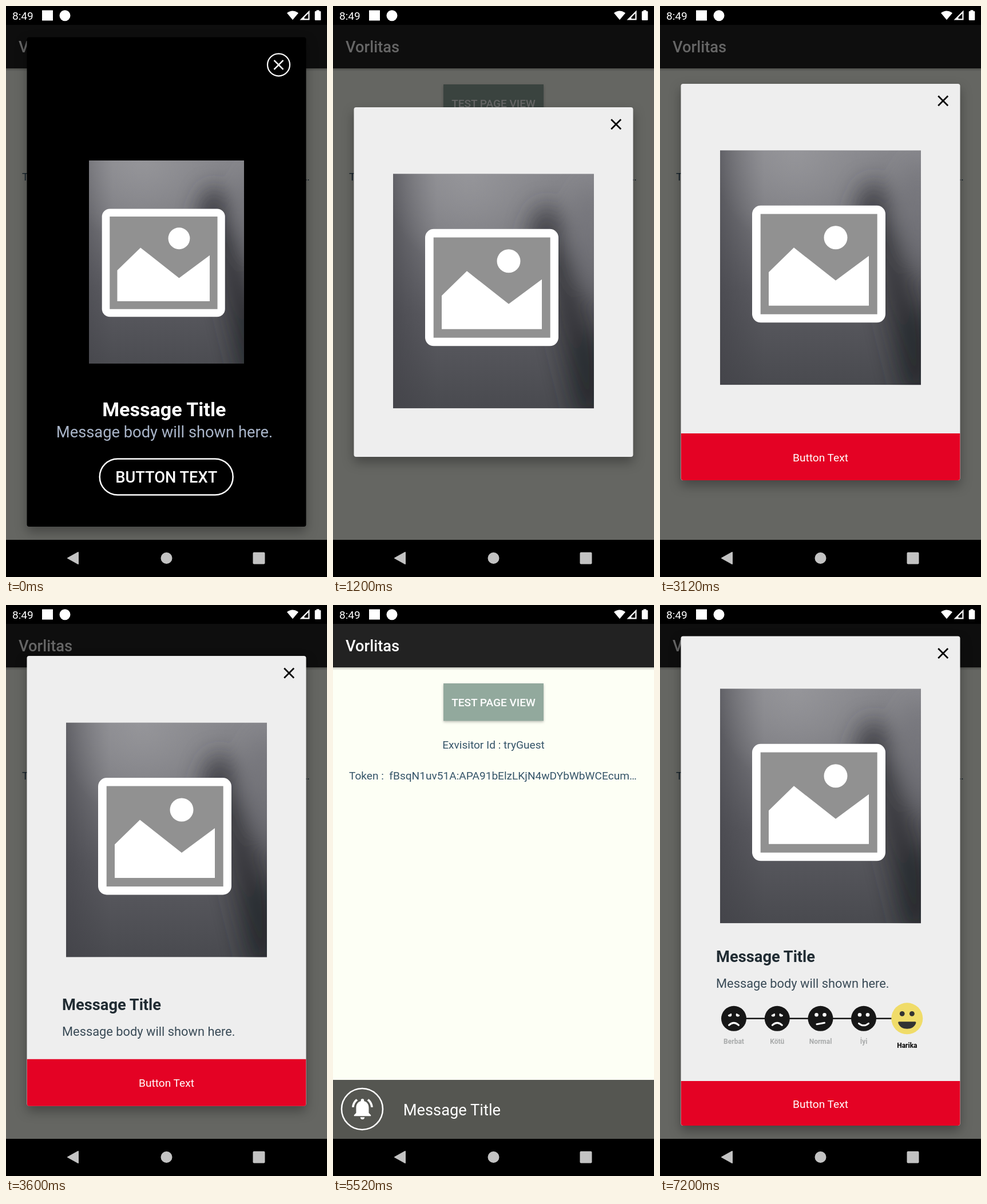
An HTML page for the animation above (8.4 s loop, 561 by 998 pixels).

```html
<!DOCTYPE html>
<html lang="en">
<head>
<meta charset="utf-8">
<title>In-app messages</title>
<style>
html, body { margin: 0; width: 100%; height: 100%; overflow: hidden; background: #000; }
svg { display: block; }
body > svg { width: 561px; height: 998px; }
text { font: 19.1px Roboto, sans-serif; white-space: pre; }
.mid { text-anchor: middle; }
.med { font-weight: 500; }
.bold { font-weight: 700; }
.t16 { font-size: 21.84px; }
.t20 { font-size: 27.3px; }
.t25 { font-size: 34.1px; }
.info { fill: #355469; }
.card { fill: #eee; filter: drop-shadow(0 9px 10px rgba(0,0,0,.32)); }
.red { fill: #e40224; }
.line { fill: none; stroke: #fff; stroke-width: 2.5; }
.rate text { font-size: 12px; font-weight: 700; fill: #a9abab; text-anchor: middle; }
.mouth { fill: none; stroke: #fff; stroke-width: 3; stroke-linecap: round; }

/* Seven scenes of 1.2 s each, with hard cuts */
.scene { visibility: hidden; animation: show 8.4s step-end infinite; }
.dim { animation: hide 8.4s step-end infinite; }
.scene, .dim { animation-delay: calc((var(--i) - 7) * 1.2s); }
@keyframes show { 0% { visibility: visible; } 14.285714% { visibility: hidden; } }
@keyframes hide { 0% { visibility: hidden; } 14.285714% { visibility: visible; } }
</style>
</head>
<body>
<svg viewBox="0 0 561 998">
  <defs>
    <linearGradient id="tone" x2="0" y2="1">
      <stop stop-color="#87878c"/>
      <stop offset=".25" stop-color="#7b7b80"/>
      <stop offset=".6" stop-color="#5c5c62"/>
      <stop offset="1" stop-color="#494a4f"/>
    </linearGradient>
    <linearGradient id="edge">
      <stop stop-color="#414147" stop-opacity=".6"/>
      <stop offset=".22" stop-color="#414147" stop-opacity="0"/>
    </linearGradient>
    <radialGradient id="glow" cx=".38" cy="0" r=".42">
      <stop stop-color="#9a9a9e" stop-opacity=".75"/>
      <stop offset="1" stop-color="#9a9a9e" stop-opacity="0"/>
    </radialGradient>
    <linearGradient id="drop" x2="0" y2="1">
      <stop stop-opacity=".22"/>
      <stop offset="1" stop-opacity="0"/>
    </linearGradient>
    <filter id="soft" x="-100%" y="-100%" width="300%" height="300%">
      <feGaussianBlur stdDeviation="20"/>
    </filter>
    <clipPath id="crop"><path d="M0 0h351v410H0z"/></clipPath>

    <g id="pic">
      <g clip-path="url(#crop)">
        <path d="M0 0h351v410H0z" fill="url(#tone)"/>
        <path d="M0 0h351v410H0z" fill="url(#edge)"/>
        <path d="M0 0h351v410H0z" fill="url(#glow)"/>
        <g filter="url(#soft)">
          <ellipse cx="268" cy="118" rx="30" ry="62" fill="#37383d" opacity=".85"/>
          <path d="M258 120L305 140 350 265 375 420 320 425 285 270Z" fill="#303136" opacity=".8"/>
          <ellipse cx="345" cy="355" rx="30" ry="85" fill="#222327" opacity=".75"/>
          <ellipse cx="345" cy="110" rx="22" ry="90" fill="#717177" opacity=".75"/>
        </g>
      </g>
      <g transform="translate(56 96.5)" fill="#fff">
        <rect width="233" height="204.5" rx="15"/>
        <path d="M14.7 14.6h204v175.3h-204z" fill="#919191"/>
        <circle cx="146" cy="56" r="20.5"/>
        <path d="M29 175V116.5L73 73.5 146 131 204 88V175z"/>
      </g>
    </g>

    <path id="x" d="M-8.5-8.5l17 17m0-17l-17 17" fill="none" stroke="#000" stroke-width="2.7"/>
    <path id="foot" class="red" d="M0 0h487.5v78a4 4 0 0 1-4 4h-479.5a4 4 0 0 1-4-4z"/>
    <text id="label" class="mid" x="280.5" fill="#fff">Button Text</text>
    <g id="msg">
      <text class="bold t20" x="98" fill="#212c33">Message Title</text>
      <text class="t16" x="98" y="45.3" fill="#3a4b57">Message body will shown here.</text>
    </g>
    <path id="star" fill="#ccc" transform="translate(-32.4 -5.4) scale(2.7)"
      d="M12 17.27L18.18 21l-1.64-7.03L22 9.24l-7.19-.61L12 2 9.19 8.63 2 9.24l5.46 4.73L5.82 21z"/>
    <g id="face">
      <circle r="22" fill="#171717"/>
      <circle cx="-7" cy="-6.5" r="3.3" fill="#fff"/>
      <circle cx="7" cy="-6.5" r="3.3" fill="#fff"/>
    </g>
    <path id="frown" class="mouth" d="M-8.5 11.5Q0 3.5 8.5 11.5"/>
    <path id="brows" d="M-13-9L-3-13V-10L-12-5zM13-9L3-13V-10L12-5z" fill="#171717"/>
  </defs>

  <!-- App page -->
  <path d="M0 33h561v900H0z" fill="#fdfff5"/>
  <path d="M0 109h561v5H0z" fill="url(#drop)"/>
  <path d="M0 33h561v76H0z" fill="#222"/>
  <text class="med t20" x="22" y="81.3" fill="#fff">Vorlitas</text>
  <path d="M193 137h175v65.5H193z" fill="#92a99d" style="filter:drop-shadow(0 2px 2px rgba(0,0,0,.25))"/>
  <text class="mid med" x="280.5" y="176.8" fill="#fff">TEST PAGE VIEW</text>
  <text class="mid info" x="280.5" y="250.8">Exvisitor Id : tryGuest</text>
  <text class="info" x="28" y="304.5">Token :  fBsqN1uv51A:APA91bElzLKjN4wDYbWbWCEcum…</text>
  <path class="dim" style="--i:4" d="M0 33h561v900H0z" fill-opacity=".6"/>

  <g class="scene" style="--i:0">
    <rect class="card" x="36.5" y="54.5" width="488" height="855.5" rx="4" style="fill:#000"/>
    <circle class="line" cx="476.5" cy="102.8" r="19.5" style="stroke-width:2.2"/>
    <path class="line" d="M468.5 94.8l16 16m0-16l-16 16"/>
    <svg x="145" y="270" width="271" height="355" viewBox="31.4 4.9 293.6 384.6"><use href="#pic"/></svg>
    <text class="mid bold t25" x="276.3" y="716.5" fill="#fff">Message Title</text>
    <text class="mid t20" x="277" y="754.3" fill="#a9b5c9">Message body will shown here.</text>
    <rect class="line" x="163.7" y="791.5" width="233" height="63" rx="31.5"/>
    <text class="mid med t20" x="280.3" y="833" fill="#fff">BUTTON TEXT</text>
  </g>

  <g class="scene" style="--i:1">
    <rect class="card" x="36.5" y="177" width="488" height="611" rx="4"/>
    <use href="#x" x="494.7" y="206.8"/>
    <use href="#pic" x="105" y="293.3"/>
  </g>

  <g class="scene" style="--i:2">
    <rect class="card" x="36.5" y="136" width="488" height="693" rx="4"/>
    <use href="#x" x="494.7" y="165.8"/>
    <use href="#pic" x="105" y="252.3"/>
    <use href="#foot" x="36.8" y="747"/>
    <use href="#label" y="795.5"/>
  </g>

  <g class="scene" style="--i:3">
    <rect class="card" x="36.5" y="89" width="488" height="786.5" rx="4"/>
    <use href="#x" x="494.7" y="119"/>
    <use href="#pic" x="105" y="205.5"/>
    <use href="#msg" y="708"/>
    <use href="#foot" x="36.8" y="793.7"/>
    <use href="#label" y="842.2"/>
  </g>

  <g class="scene" style="--i:4" fill="#fff">
    <path d="M0 830h561v103H0z" fill="#555651"/>
    <circle class="line" cx="51" cy="881" r="36"/>
    <path transform="translate(29.4 858.4) scale(1.84)" d="M7.58 4.08L6.15 2.65C3.75 4.48 2.17 7.3 2.03 10.5h2c.15-2.65 1.51-4.97 3.55-6.42zM19.97 10.5h2c-.15-3.2-1.73-6.02-4.12-7.85l-1.42 1.43c2.02 1.45 3.39 3.77 3.54 6.42zM18 11c0-3.07-1.64-5.64-4.5-6.32V4a1.5 1.5 0 0 0-3 0v.68C7.63 5.36 6 7.92 6 11v5l-2 2v1h16v-1l-2-2zM10 20a2 2 0 0 0 4 0z"/>
    <text class="t20" x="122.7" y="892">Message Title</text>
  </g>

  <g class="scene" style="--i:5">
    <rect class="card" x="36.5" y="54.5" width="488" height="855.5" rx="4"/>
    <use href="#x" x="494.7" y="84.5"/>
    <use href="#pic" x="105" y="167"/>
    <use href="#msg" y="665.7"/>
    <use href="#star" transform="translate(149.5 730)"/>
    <use href="#star" transform="translate(215 730)"/>
    <use href="#star" transform="translate(280.5 730)"/>
    <use href="#star" transform="translate(346 730)"/>
    <use href="#star" transform="translate(411.5 730)"/>
    <use href="#foot" x="36.8" y="828.5"/>
    <use href="#label" y="877"/>
  </g>

  <g class="scene" style="--i:6">
    <rect class="card" x="36.5" y="54.5" width="488" height="855.5" rx="4"/>
    <use href="#x" x="494.7" y="84.5"/>
    <use href="#pic" x="105" y="146.3"/>
    <use href="#msg" y="624"/>
    <g class="rate">
      <path d="M129 722.8H420" stroke="#171717" stroke-width="2.6"/>
      <g transform="translate(129 722.8)">
        <use href="#face"/><use href="#brows"/><use href="#frown"/>
        <text y="44.2">Berbat</text>
      </g>
      <g transform="translate(204.8 722.8)">
        <use href="#face"/><use href="#brows"/><use href="#frown"/>
        <text y="44.2">Kötü</text>
      </g>
      <g transform="translate(280.5 722.8)">
        <use href="#face"/><path class="mouth" d="M-6.5 10L7 7.5"/>
        <text y="44.2">Normal</text>
      </g>
      <g transform="translate(356 722.8)">
        <use href="#face"/><path class="mouth" d="M-8.5 8.5Q0 15.5 8.5 8.5"/>
        <text y="44.2">İyi</text>
      </g>
      <g transform="translate(431.8 722.8)" fill="#333">
        <circle r="27.5" fill="#f0dc69"/>
        <circle cx="-8.6" cy="-8.5" r="4.4"/>
        <circle cx="8.6" cy="-8.5" r="4.4"/>
        <path d="M-14 5.5H14Q16 5.5 15.5 8C13 15 7 18 0 18S-13 15-15.5 8Q-16 5.5-14 5.5z"/>
        <text y="51" style="fill:#000">Harika</text>
      </g>
    </g>
    <path class="red" d="M36.8 832h487.5v74a4 4 0 0 1-4 4h-479.5a4 4 0 0 1-4-4z"/>
    <use href="#label" y="878.5"/>
  </g>

  <!-- System bars -->
  <path d="M0 0h561v33H0zM0 933h561v65H0z"/>
  <g fill="#fff">
    <text x="11" y="23.8">8:49</text>
    <rect x="63" y="7.5" width="19" height="18"/>
    <circle cx="103" cy="16.7" r="9.5"/>
    <path d="M491 12.3Q501 4.8 511 12.3L501 24.3z"/>
    <path d="M530.5 7.5V24.5H513.5zM528.3 13L521.5 19.8V22.3H528.3z" fill-rule="evenodd"/>
    <path d="M542.5 9V7.2h5V9h1.5q1.3 0 1.3 1.3v13.4q0 1.3-1.3 1.3h-8q-1.3 0-1.3-1.3V10.3q0-1.3 1.3-1.3z"/>
  </g>
  <g fill="#c3c3c3">
    <path d="M108 965L126 955V975z" stroke="#c3c3c3" stroke-width="2" stroke-linejoin="round"/>
    <circle cx="280.5" cy="965" r="10"/>
    <rect x="431.5" y="954.7" width="21" height="20.8" rx="2"/>
  </g>
</svg>
</body>
</html>
```
